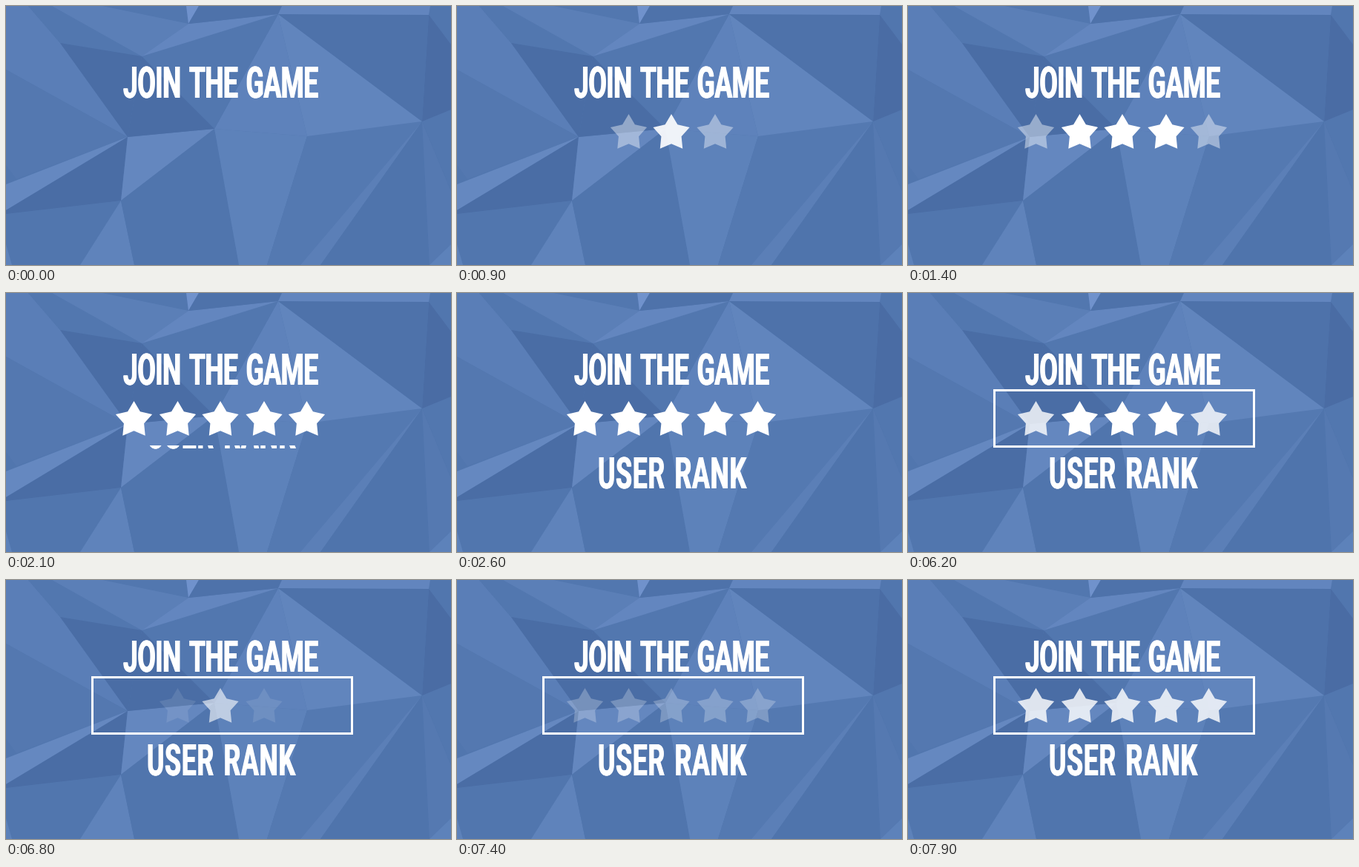
Write an HTML page that moves like this. It is 600x350 px and loops after 8000 ms.

```html
<!DOCTYPE html>
<html lang="en">
<head>
<meta charset="utf-8">
<title>Join the game</title>
<style>
html, body { margin: 0; width: 100%; height: 100%; overflow: hidden; background: #5176ae; }
#stage { position: absolute; left: 0; top: 0; width: 600px; height: 350px; overflow: hidden; }
svg { position: absolute; left: 0; top: 0; }
.line {
  position: absolute; white-space: nowrap; color: #fff;
  font: 700 59px/60px Roboto, sans-serif; font-kerning: none; word-spacing: 5px;
  text-shadow: -1px 0 #fff, 1px 0 #fff;
  transform: scaleX(.6); transform-origin: 0 0;
}
#title { left: 158px; top: 74px; letter-spacing: -.8px; }
#mask { position: absolute; left: 0; top: 206px; width: 600px; height: 80px; overflow: hidden; }
#rank { left: 189.5px; letter-spacing: 1.4px; }
</style>
</head>
<body>
<div id="stage">
  <svg width="600" height="350">
    <g id="facets"></g>
    <g id="stars" fill="#fff"></g>
    <path id="frame" d="M116.5 131.5H466.5V207.5H116.5Z" pathLength="100" fill="none" stroke="#fff" stroke-width="3"/>
  </svg>
  <div id="title" class="line">JOIN THE GAME</div>
  <div id="mask"><div id="rank" class="line">USER RANK</div></div>
</div>
<script>
const $ = id => document.getElementById(id);
const clamp = v => Math.max(0, Math.min(1, v));
const ramp = (t, start, length) => clamp((t - start) / length);
const ease = p => p < .5 ? 2 * p * p : 1 - 2 * (1 - p) * (1 - p);

function add(parent, tag, attrs) {
  const node = document.createElementNS("http://www.w3.org/2000/svg", tag);
  for (const key in attrs) node.setAttribute(key, attrs[key]);
  return parent.appendChild(node);
}

// Shared corners of the low-poly backdrop
const corners = {
  a: "246,24", b: "183,68", c: "367,11", d: "570,12", e: "561,156", f: "406,176",
  g: "281,166", h: "164,177", i: "155,263", j: "73,50"
};
const facets = [
  ["0,0 30,0 j h 0,86", "#5a7eb7"],
  ["30,0 j b 62,0", "#5277af"],
  ["62,0 244,0 a b", "#5b7fb7"],
  ["130,0 244,0 a", "#5277af"],
  ["j b h", "#4a6da5"],
  ["0,86 h 14,234 0,215", "#5478b0"],
  ["0,241 h 0,276", "#6588c0"],
  ["0,276 h i 0,281", "#4a6da5"],
  ["0,322 8,350 0,350", "#5d82ba"],
  ["i 100,350 173,350", "#5f83bb"],
  ["h g i", "#6487bf"],
  ["g i 173,350 314,350", "#5075ad"],
  ["g f 352,350 314,350", "#5d82ba"],
  ["f e 397,350 352,350", "#5479b1"],
  ["e 397,350 424,350", "#5b7fb7"],
  ["e 424,350 571,350", "#4f74ac"],
  ["e 571,350 600,322 600,250", "#5579b1"],
  ["571,350 600,322 600,350", "#5d82ba"],
  ["e 600,250 600,140", "#5277af"],
  ["d e 600,140 600,52", "#4a6ca4"],
  ["c g f", "#5e82bb"],
  ["c f e", "#6185bd"],
  ["c d e", "#4e72aa"],
  ["b c g", "#5277af"],
  ["b g h", "#4a6da5"],
  ["a c b", "#6386bf"],
  ["243,0 260,0 a", "#7092cc"],
  ["260,0 372,0 c a", "#4e72aa"],
  ["372,0 572,0 d c", "#6285be"]
];
for (const [shape, fill] of facets)
  add($("facets"), "polygon", { points: shape.replace(/[a-j]/g, k => corners[k]), fill });

const star = x => Array.from({ length: 10 }, (_, k) => {
  const r = k % 2 ? 14.3 : 25.9, a = k * Math.PI / 5;
  return `${x + r * Math.sin(a)},${171.9 - r * Math.cos(a)}`;
}).join(" ");
const stars = [172.5, 231.5, 289, 348, 405.5].map(x => add($("stars"), "polygon", { points: star(x) }));

function starAlpha(t, ring) {
  if (t < 3000) return ramp(t, [270, 620, 1100][ring], 700);
  if (t < 7150) return 1 - ramp(t, 6600 - 250 * ring, 500);
  return ramp(t, 7190, 870);
}

function draw(now) {
  const t = Math.floor(now % 8000 / 100) * 100;
  stars.forEach((s, k) => s.setAttribute("opacity", starAlpha(t, Math.abs(k - 2))));
  $("rank").style.top = 7.5 - 60 * (1 - ease(ramp(t, 1960, 600))) + "px";
  const drawn = ease(ramp(t, 2900, 900));
  $("frame").setAttribute("stroke-dasharray", drawn < 1 ? `${drawn * 100} 100` : "none");
  $("frame").style.visibility = drawn ? "visible" : "hidden";
}

const start = performance.now();
function tick() {
  draw(performance.now() - start);
  requestAnimationFrame(tick);
}
tick();
</script>
</body>
</html>
```
